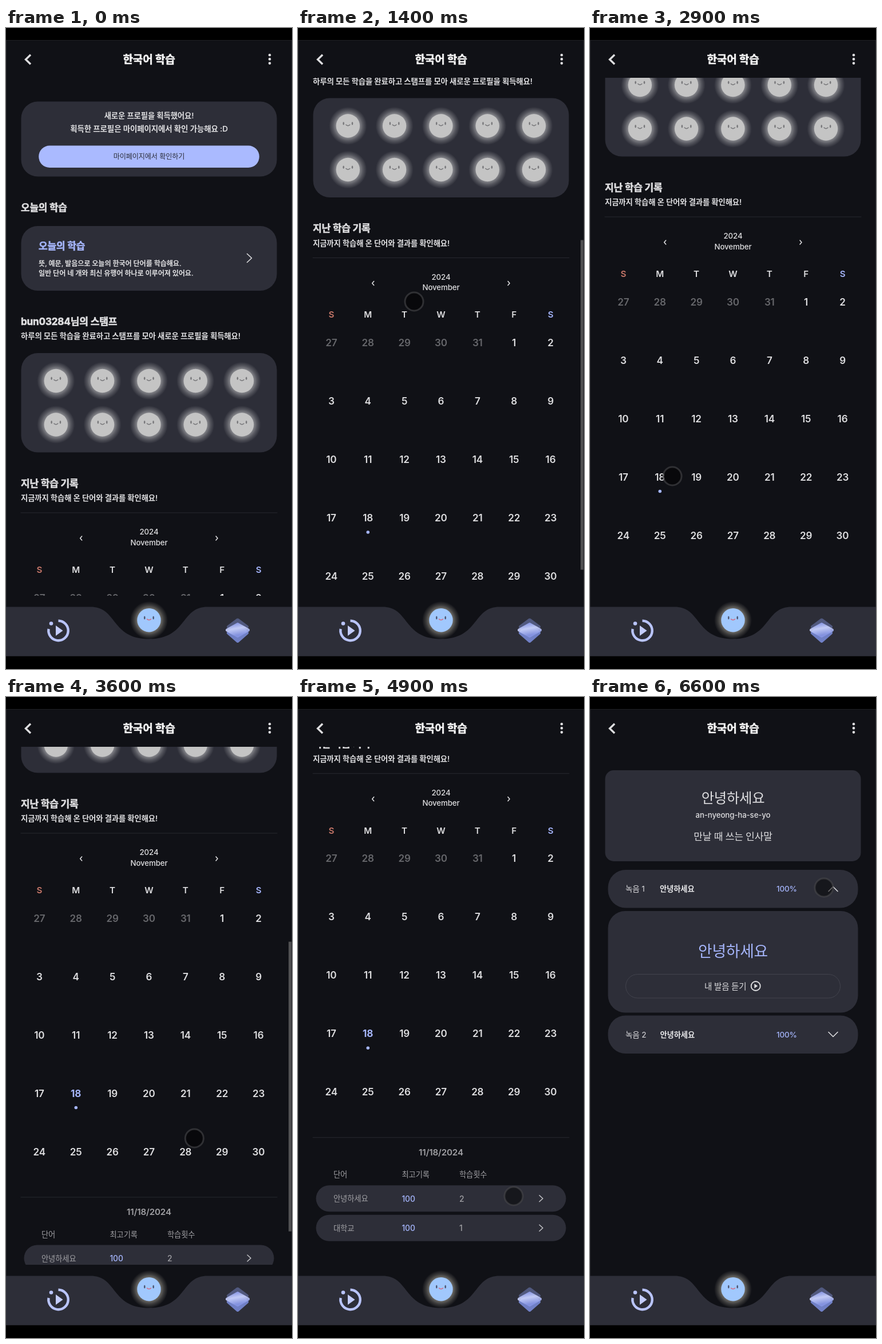
An HTML page that plays this animation: 500x1120 px, repeating every 8 s.

```html
<!DOCTYPE html>
<html lang="ko">
<head>
<meta charset="utf-8">
<style>
  html, body { margin: 0; width: 100%; height: 100%; overflow: hidden; background: #000; }
  svg { display: block; width: 500px; height: 1120px; }
  text { font-family: Inter, 'Noto Sans CJK KR', 'Noto Sans CJK', sans-serif; letter-spacing: -.01em; }
  .line { fill: none; stroke-linecap: round; stroke-linejoin: round; }
</style>
</head>
<body>
<svg id="stage" viewBox="0 0 500 1120"></svg>
<script>
const BG = '#101116', CARD = '#2d2e38', BLUE = '#a5b5fb', LIGHT = '#dedee0', GREY = '#a0a0a4';

// y is the optical middle of the line; headings get a thin outline for extra weight
const text = (x, y, size, str, fill = LIGHT, weight = 500, anchor = 'start', id = '') =>
  `<text ${id && `id="${id}"`} x="${x}" y="${y + size * .37}" font-size="${size * .95}" fill="${fill}" font-weight="${weight}" text-anchor="${anchor}" ${weight === 700 ? `stroke="${fill}" stroke-width=".6"` : ''}>${str}</text>`;
const mid = (y, size, str, fill, weight) => text(250, y, size, str, fill, weight, 'middle');
const card = (x, y, w, h, r, fill = CARD, extra = '') =>
  `<rect x="${x}" y="${y}" width="${w}" height="${h}" rx="${r}" fill="${fill}" ${extra}/>`;
const line = (d, width = 1.6, stroke = LIGHT, extra = '') =>
  `<path class="line" d="${d}" stroke="${stroke}" stroke-width="${width}" ${extra}/>`;
const dot = (x, y, r, fill) => `<circle cx="${x}" cy="${y}" r="${r}" fill="${fill}"/>`;
const rule = y => line(`M26 ${y}H474`, 1, '#27282f');

const face = (x, y, fill, glow, eye, mouth) =>
  dot(x, y, 33, `url(#${glow})`) + dot(x, y, 20.7, fill) +
  [-7.7, 7.7].map(d => `<ellipse cx="${x + d}" cy="${y - 4.3}" rx="1.3" ry="2.8" fill="${eye}"/>`).join('') +
  line(`M${x - 3.5} ${y - 2}q3.5 3.4 7 0`, 1.3, mouth);

const glow = (id, rgb) => `<radialGradient id="${id}">
  <stop offset=".6" stop-color="rgb(${rgb})" stop-opacity=".52"/>
  <stop offset=".8" stop-color="rgb(${rgb})" stop-opacity=".22"/>
  <stop offset="1" stop-color="rgb(${rgb})" stop-opacity="0"/></radialGradient>`;

function calendar() {
  const colX = i => 58.3 + 63.87 * i;
  let out = '';
  [...'SMTWTFS'].forEach((d, i) => {
    out += text(colX(i), 946, 16, d, ['#c8786a', , , , , , BLUE][i] || LIGHT, 600, 'middle');
  });
  for (let i = 0; i < 35; i++) {
    const day = i < 5 ? 27 + i : i - 4;
    out += text(colX(i % 7), 995 + 102 * Math.floor(i / 7), 18, day,
      i < 5 ? '#66676b' : LIGHT, 600, 'middle', day === 18 ? 'picked' : '');
  }
  return out + dot(122.3, 1326.5, 2.8, BLUE);
}

function stamps() {
  let out = card(26.5, 568, 447, 173.5, 29);
  for (const y of [616.5, 693])
    for (let i = 0; i < 5; i++) out += face(87.3 + 81.3 * i, y, '#c4c4c4', 'white', '#77777a', '#77777a');
  return out;
}

const resultRow = (y, word, count) => card(31.5, y, 437, 46, 23) +
  text(62, y + 23, 14, word, GREY) + text(181.5, y + 23, 14.6, '100', BLUE) +
  text(282, y + 23, 14.6, count, GREY) + line(`M422 ${y + 17.5}l6 5.5l-6 5.5`, 1.5, '#c4c4c8');

const home =
  card(26.5, 128.5, 447, 131, 29) +
  mid(152.5, 14.1, '새로운 프로필을 획득했어요!', LIGHT, 600) +
  mid(175.5, 14.2, '획득한 프로필은 마이페이지에서 확인 가능해요 :D', LIGHT, 600) +
  card(57.2, 205.5, 385.6, 38.5, 19.2, '#aabaff') +
  mid(224, 12.75, '마이페이지에서 확인하기', '#2b2d38', 400) +
  text(26, 313, 17.8, '오늘의 학습', LIGHT, 700) +
  card(26.5, 346, 447, 113, 29) +
  text(57, 380, 17.9, '오늘의 학습', BLUE, 700) +
  text(57, 411, 12.8, '뜻, 예문, 발음으로 오늘의 한국어 단어를 학습해요.', LIGHT, 600) +
  text(57, 428.5, 12.8, '일반 단어 네 개와 최신 유행어 하나로 이루어져 있어요.', LIGHT, 600) +
  line('M421.5 394.5l8 7.5l-8 7.5') +
  text(26, 512, 18, 'bun03284님의 스탬프', LIGHT, 700) +
  text(26, 538, 14.12, '하루의 모든 학습을 완료하고 스탬프를 모아 새로운 프로필을 획득해요!', LIGHT, 600) +
  stamps() +
  text(26, 795, 17.9, '지난 학습 기록', LIGHT, 700) +
  text(26, 821, 14.08, '지금까지 학습해 온 단어와 결과를 확인해요!', LIGHT, 600) +
  rule(847) +
  mid(880, 14, '2024', LIGHT, 500) + mid(898.5, 14, 'November', LIGHT, 500) +
  line('M132.7 888l-3 3.5l3 3.5') + line('M367 888l3 3.5l-3 3.5') +
  calendar() +
  `<g id="results">${rule(1483)}${mid(1508.5, 16, '11/18/2024', GREY, 600)}
  ${text(62, 1547.5, 14, '단어', GREY)}${text(181.5, 1547.5, 14, '최고기록', GREY)}${text(282, 1547.5, 14, '학습횟수', GREY)}
  ${resultRow(1566.5, '안녕하세요', 2)}${resultRow(1618, '대학교', 1)}</g>`;

const record = (y, n) => card(31.5, y, 437, 66.5, 31) +
  text(62, y + 33, 14.2, '녹음 ' + n, LIGHT, 400) + text(121.5 + n * .5, y + 33, 14, '안녕하세요', '#e6e6e8', 600) +
  text(326, y + 33, 14.2, '100%', BLUE);
const down = y => line(`M417 ${y}l8 8l8 -8`);

const word =
  card(26.5, 128, 447, 159, 15) +
  mid(176, 25.6, '안녕하세요', LIGHT, 400) +
  mid(206, 14, 'an-nyeong-ha-se-yo', LIGHT, 500) +
  mid(243.5, 18, '만날 때 쓰는 인사말', LIGHT, 500) +
  record(302, 1) +
  `<g id="shut">${down(331.5)}</g>
  <g id="open">${line('M417 339.5l8 -8l8 8')}${card(31.5, 374, 437, 177.5, 30)}
  ${mid(443.5, 28.2, '안녕하세요', BLUE, 400)}
  ${card(62.5, 484.5, 375, 41.5, 20.7, 'none', 'stroke="#42434d"')}
  ${text(200, 505, 15.3, '내 발음 듣기', LIGHT, 500)}
  <circle cx="289.7" cy="505" r="8" fill="none" stroke="${LIGHT}" stroke-width="1.8"/>
  <path d="M287.3 501l6 4l-6 4z" fill="${LIGHT}"/></g>
  <g id="second">${record(373.5, 2)}${down(402.5)}</g>`;

const diamond = (y, w, h, fill, opacity) =>
  `<path d="M405 ${y - h}L${405 + w} ${y}L405 ${y + h}L${405 - w} ${y}Z" fill="${fill}" stroke="${fill}" stroke-width="6" stroke-linejoin="round" opacity="${opacity}"/>`;

const frame =
  `<path d="M0 1011.5H148C195 1011.5 183 1067.5 250 1067.5S305 1011.5 352 1011.5H500V1097H0Z" fill="${CARD}"/>` +
  line('M91.5 1035.8A17.2 17.2 0 1 1 74.6 1050', 4.4, '#b9c4fb', 'style="stroke-linecap:butt"') +
  dot(79, 1040.5, 3.3, '#b9c4fb') + '<path d="M87 1044l12.5 9l-12.5 9z" fill="#c3ccfc"/>' +
  diamond(1057, 16, 14, '#7080c6', 1) + diamond(1046.5, 16, 12, '#5d6897', .75) +
  diamond(1052, 18, 10, 'url(#shine)', .9) +
  face(250, 1034.7, '#a1c8fd', 'warm', '#4c5570', '#d8667c') +
  line('M43 46.8l-8.5 8.2l8.5 8.2', 3.4, LIGHT, 'style="stroke-linecap:butt;stroke-linejoin:miter"') +
  mid(55, 20.1, '한국어 학습', '#f6f6f6', 700) +
  [47.2, 54.4, 61.6].map(y => dot(461, y, 2.3, LIGHT)).join('');

const stage = document.getElementById('stage');
stage.innerHTML = `<defs>${glow('white', '225,225,225')}${glow('warm', '205,200,185')}
  <linearGradient id="shine" x2=".3" y2="1"><stop stop-color="#8b9aea"/><stop offset=".45" stop-color="#cdd5ff"/><stop offset="1" stop-color="#8796e4"/></linearGradient>
  <clipPath id="view"><rect y="87" width="500" height="905"/></clipPath></defs>
  <rect width="500" height="1120"/>
  <rect x=".5" y="21.5" width="499" height="1076" fill="${BG}" stroke="#1f2024"/>
  <g id="home" clip-path="url(#view)"><g id="page">${home}</g>
  <rect id="thumb" x="494" width="5" fill="#505052"/></g>
  <g id="word">${word}</g>${frame}
  <circle id="cursor" r="16" fill="rgba(0,0,0,.5)" stroke="rgba(72,72,76,.6)" stroke-width="3"/>`;

const $ = id => document.getElementById(id);
const show = (id, on) => $(id).setAttribute('visibility', on ? 'inherit' : 'hidden');

// Linear walk through [time, value...] keys
function at(keys, t) {
  if (t <= keys[0][0]) return keys[0].slice(1);
  for (let i = 1; i < keys.length; i++) {
    const a = keys[i - 1], b = keys[i];
    if (t <= b[0]) return b.slice(1).map((v, j) => a[j + 1] + (v - a[j + 1]) * (t - a[0]) / (b[0] - a[0]));
  }
  return keys[keys.length - 1].slice(1);
}

const scrollKeys = [[800, 0], [900, 14.3], [1100, 160], [1400, 445.5], [1500, 485], [1700, 517],
  [3400, 517], [3700, 655], [3900, 704], [4000, 713.3]];
const thumbKeys = [[800, 0], [900, 1], [1800, 1], [2100, 0], [3400, 0], [3500, 1], [4000, 1], [4200, .45], [4400, 0]];
const cursorKeys = [[300, 406, 1044], [500, 270, 690], [700, 194, 457], [900, 194, 456], [1400, 203, 478],
  [1800, 205, 485], [2200, 182, 660], [2600, 157, 772], [2900, 144, 783], [3000, 130, 786], [3100, 132, 786],
  [3300, 320, 770], [4200, 348, 773], [4500, 374, 852], [4900, 377, 872], [5400, 376, 868],
  [5500, 376, 814], [5900, 395, 470], [6200, 409, 333]];

function draw(t) {
  const [scroll] = at(scrollKeys, t), [x, y] = at(cursorKeys, t);
  const picked = t >= 3100, onWord = t >= 5100, opened = t >= 6500;
  const range = picked ? 713.3 : 517, size = 905 * 905 / (905 + range);

  show('home', !onWord);
  show('results', picked && !onWord);
  $('page').setAttribute('transform', `translate(0 ${-scroll})`);
  $('picked').setAttribute('fill', picked ? BLUE : LIGHT);
  $('picked').setAttribute('font-weight', picked ? 700 : 600);
  $('thumb').setAttribute('y', 87 + (905 - size) * scroll / range);
  $('thumb').setAttribute('height', size);
  $('thumb').setAttribute('opacity', at(thumbKeys, t)[0]);

  show('word', onWord);
  show('open', onWord && opened);
  show('shut', onWord && !opened);
  $('second').setAttribute('transform', `translate(0 ${opened ? 183 : 0})`);

  show('cursor', t >= 300);
  $('cursor').setAttribute('transform', `translate(${x} ${y})`);
}

// The picture advances ten times a second
function tick() {
  draw(Math.floor(performance.now() % 8000 / 100) * 100);
  requestAnimationFrame(tick);
}
tick();
</script>
</body>
</html>
```
